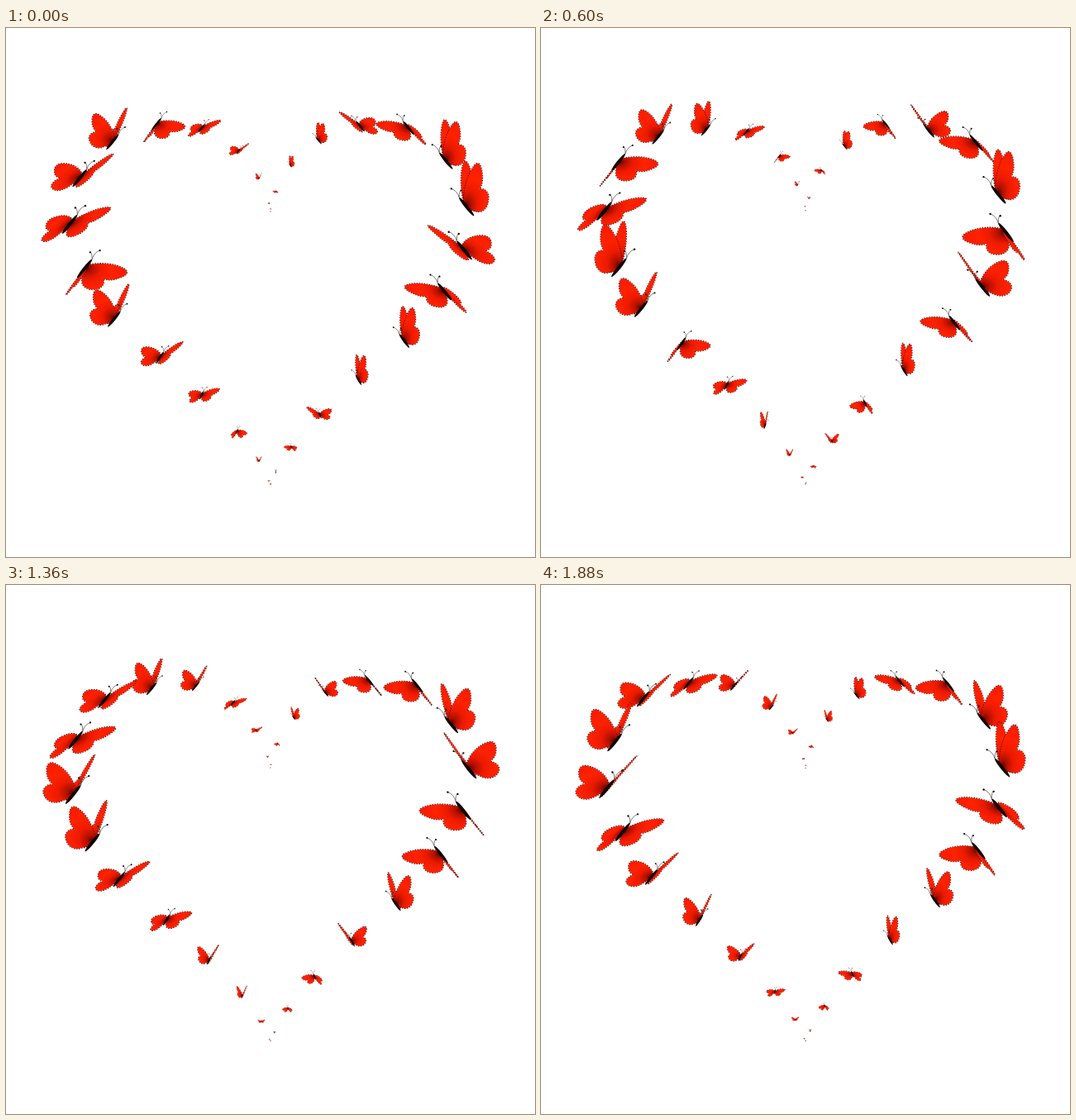
An HTML page with a canvas for the animation above (1920 ms loop, 640 px wide and 640 px high).

```html
<!DOCTYPE html>
<html lang="en">
<head>
<meta charset="utf-8">
<title>Butterfly heart</title>
<style>
html, body { margin: 0; height: 100%; overflow: hidden; background: #fff; }
canvas { display: block; width: 100vw; height: 100vh; }
</style>
</head>
<body>
<canvas id="stage" width="640" height="640"></canvas>
<script>
const ctx = document.getElementById('stage').getContext('2d');
const LOOP = 1920, STEP = 40, SLOT = 480, FRAMES = LOOP / STEP;

// Half of the heart, tip to notch: distance from the axis, y, wing length
const PATH = [
  [0, 552, .6], [2, 548, 1.4], [14, 523, 5.5], [40, 489, 13], [83, 444, 21],
  [134, 397, 30], [191, 346, 39], [222, 295, 46], [242, 237, 47], [231, 179, 44],
  [193, 132, 38], [136, 119, 31], [83, 121, 22], [39, 148, 14], [14, 181, 6.5],
  [2, 212, 1.8], [0, 222, .4]
];

// Wing beats per loop and frame of the highest pose, for four fliers on each side
const FLAPS = {
  '-1': [[5, 7], [4, 2], [6, 4.3], [4, 8.2]],
  '1': [[4, .5], [6, 3], [4, 3.3], [5, -.4]]
};

const clamp = (v, lo, hi) => Math.max(lo, Math.min(hi, v));

const red = ctx.createRadialGradient(0, 0, 0, 0, 0, 1);
red.addColorStop(0, '#4a0400');
red.addColorStop(.18, '#b01000');
red.addColorStop(.4, '#ec1a00');
red.addColorStop(.7, '#ff2200');
red.addColorStop(1, '#f81c00');

function along(u) {
  const s = clamp(u + 1, 0, PATH.length - 1.001);
  const i = Math.floor(s), f = s - i;
  const at = k => PATH[clamp(k, 0, PATH.length - 1)];
  return [0, 1, 2].map(k => {
    const a = at(i - 1)[k], b = at(i)[k], c = at(i + 1)[k], d = at(i + 2)[k];
    return b + f / 2 * (c - a + f * (2 * a - 5 * b + 4 * c - d + f * (3 * (b - c) + d - a)));
  });
}

// Fore and hind wing in their own plane: x outwards, y towards the head
function wing() {
  ctx.beginPath();
  ctx.moveTo(0, .12);
  ctx.bezierCurveTo(.2, .36, .55, .58, .88, .53);
  ctx.bezierCurveTo(1.03, .5, 1.02, .36, .94, .22);
  ctx.bezierCurveTo(.86, .08, .78, -.04, .58, -.08);
  ctx.bezierCurveTo(.72, -.2, .72, -.44, .58, -.53);
  ctx.bezierCurveTo(.44, -.66, .26, -.62, .16, -.46);
  ctx.bezierCurveTo(.1, -.34, .04, -.22, 0, -.16);
  ctx.closePath();
}

function butterfly(u, side, angle) {
  const [dx, y0, size] = along(u);
  const turn = clamp(Math.min(u / 5, (15 - u) / 3), 0, 1);
  const axis = (x, y) => [-side * x * size, y * size];
  const right = axis(1 - .2 * turn, -.15 * turn);
  const head = axis(.5 * turn, -.62);
  const up = axis(-.4 * turn, -.9);
  const cos = Math.cos(angle), sin = Math.sin(angle);
  const x = 320 + side * dx - up[0] * .2 * sin;
  const y = y0 - up[1] * .2 * sin;
  const point = (r, h, v = 0) => [0, 1].map(k =>
    (k ? y : x) + right[k] * r + head[k] * h + up[k] * v);

  for (const dir of [1, -1]) {
    const out = [0, 1].map(k => dir * right[k] * cos + up[k] * sin);
    const place = () => ctx.setTransform(out[0], out[1], head[0], head[1], x, y);
    place();
    wing();
    ctx.resetTransform();
    ctx.lineWidth = clamp(size / 16, .4, 1.6);
    ctx.setLineDash([1.5, 1.5]);
    ctx.strokeStyle = '#4a0c08';
    ctx.stroke();
    place();
    ctx.fillStyle = red;
    ctx.fill();
    ctx.resetTransform();
  }

  // Body and feelers
  const tail = point(0, -.42), nose = point(0, .36);
  const bx = nose[0] - tail[0], by = nose[1] - tail[1];
  ctx.setLineDash([]);
  ctx.fillStyle = '#120202';
  ctx.beginPath();
  ctx.ellipse((tail[0] + nose[0]) / 2, (tail[1] + nose[1]) / 2,
    Math.hypot(bx, by) / 2, size * .045, Math.atan2(by, bx), 0, 7);
  ctx.fill();
  ctx.strokeStyle = '#444';
  ctx.lineWidth = clamp(size / 60, .2, .7);
  for (const dir of [1, -1]) {
    const tip = point(dir * .16, .58, .08);
    ctx.beginPath();
    ctx.moveTo(...nose);
    ctx.quadraticCurveTo(...point(dir * .03, .5, .1), ...tip);
    ctx.stroke();
    ctx.beginPath();
    ctx.arc(...tip, size * .025, 0, 7);
    ctx.fill();
  }
}

function draw(now) {
  const frame = Math.floor(now % LOOP / STEP);
  ctx.resetTransform();
  ctx.clearRect(0, 0, 640, 640);
  // Far ones first, so that those lower on the heart overlap them
  for (let id = 15; id >= -5; id--) {
    for (const side of [-1, 1]) {
      const u = id + frame * STEP / SLOT + (side > 0 ? .5 : 0);
      if (u < -1 || u > 15) continue;
      const [beats, peak] = FLAPS[side][(id + 8) % 4];
      const beat = Math.cos((frame - peak) * beats * 2 * Math.PI / FRAMES);
      butterfly(u, side, (21 + 59 * beat) * Math.PI / 180);
    }
  }
}

const start = performance.now();
function tick() {
  draw(performance.now() - start);
  requestAnimationFrame(tick);
}
tick();
</script>
</body>
</html>
```
